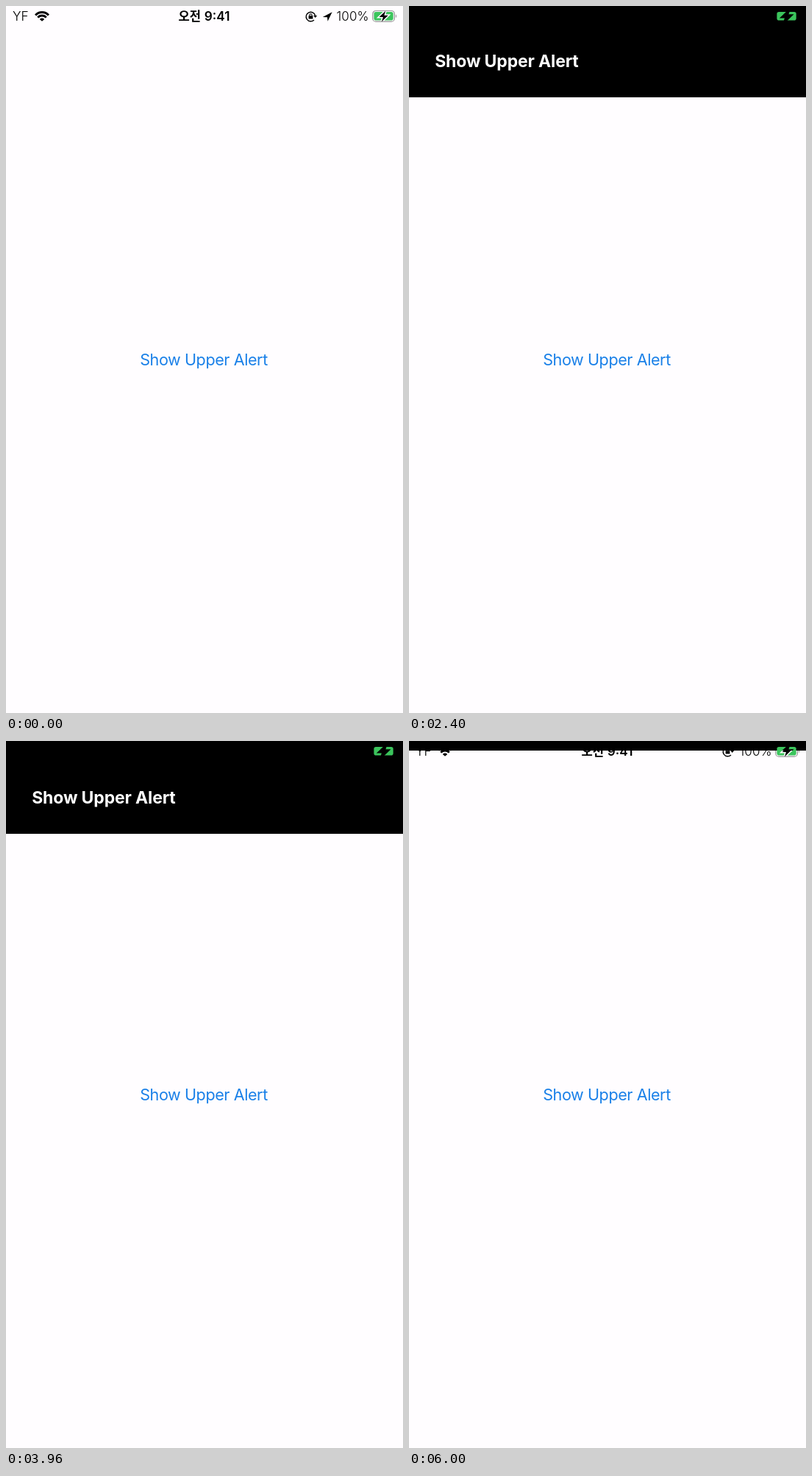
An HTML page for the animation above (6.04 s loop, 540x960 px).

```html
<!DOCTYPE html>
<html lang="en">
<head>
<meta charset="utf-8">
<title>Upper alert</title>
<style>
  html, body { margin: 0; width: 100%; height: 100%; overflow: hidden; background: #fffdff; }
  svg { display: block; width: 100%; height: 100%; }
  text { font-family: Inter, Roboto, sans-serif; }
  .hangul { font-family: "Noto Sans CJK KR", "Noto Sans CJK", "Noto Sans KR", sans-serif; }
</style>
</head>
<body>
<svg viewBox="0 0 540 960">
  <defs>
    <path id="bolt" d="M516.3 6.8 507.6 15H512.9L511 21.2 519.8 12.7H514.4Z"/>
    <mask id="boltGap" maskUnits="userSpaceOnUse" x="495" y="0" width="40" height="30">
      <rect x="495" width="40" height="30" fill="#fff"/>
      <use href="#bolt" stroke="#000" stroke-width="3"/>
    </mask>
  </defs>

  <text id="button" x="269" y="488" text-anchor="middle" font-size="21.6" letter-spacing="-.43" fill="#1a80e8">Show Upper Alert</text>

  <g id="alert">
    <rect y="-100" width="540" height="226"/>
    <text x="35.2" y="85" font-size="23" font-weight="700" letter-spacing="-.15" fill="#fff">Show Upper Alert</text>
  </g>

  <!-- status bar -->
  <g font-size="17.3">
    <text x="9" y="20.3" font-weight="300">YF</text>
    <text class="hangul" x="234.5" y="20" font-size="16.6" font-weight="600">오전</text>
    <text x="269.8" y="20.3" font-weight="600">9:41</text>
    <text x="449.6" y="20.3" font-size="17.1" font-weight="300">100%</text>
  </g>
  <g fill="none" stroke="#000" stroke-width="2.9">
    <path d="M40.1 12.5A12 12 0 0 1 57.9 12.5M43.3 15.6A7.6 7.6 0 0 1 54.7 15.6"/>
    <path d="M49 20.8 45.8 17.9A4.2 4.2 0 0 1 52.2 17.9Z" fill="#000" stroke="none"/>
  </g>
  <g id="lock" fill="none" stroke="#000" stroke-width="1.4">
    <path d="M420.6 13A6.3 6.3 0 1 0 419 18.9"/>
    <path d="M412.9 13.5V12.4A1.6 1.6 0 0 1 416.1 12.4V13.5" stroke-width="1.1"/>
    <path d="M411.6 13.2h5.8v4.4h-5.8ZM418.2 12.9h5l-2.5 3.2Z" fill="#000" stroke="none"/>
  </g>
  <path id="arrow" d="M430.8 15 443.6 8.3 437.6 20.8 437 15.2Z"/>
  <g>
    <rect x="498.8" y="6.5" width="29.6" height="14.6" rx="4.2" fill="none" stroke="#000" stroke-opacity=".42" stroke-width="1.2"/>
    <path d="M530 11.3Q532.2 13.8 530 16.3Z" fill-opacity=".45"/>
    <rect x="500.4" y="8" width="26.3" height="11.6" rx="2.8" fill="#3bc45c" mask="url(#boltGap)"/>
    <use href="#bolt"/>
  </g>
</svg>
<script>
const LOOP = 6040, HEIGHT = 126, SHOW = 300, HIDE = 200;
const alerts = [[825, 2384], [2610, 4110], [4350, 5845]];   // slide down, slide up
const presses = [[835, 880], [2600, 2985]];                 // touch down, release
const FADE = 300, PRESSED = 0.2;
const $ = id => document.getElementById(id);

// cubic-bezier(.42, 0, .58, 1)
function ease(x) {
  if (x <= 0) return 0;
  if (x >= 1) return 1;
  let lo = 0, hi = 1, s = 0.5;
  for (let i = 0; i < 20; i++) {
    s = (lo + hi) / 2;
    const u = 1 - s;
    if (1.26 * u * u * s + 1.74 * u * s * s + s ** 3 < x) lo = s; else hi = s;
  }
  return s * s * (3 - 2 * s);
}

function draw(t) {
  let shown = 0, opacity = 1;
  for (const [down, up] of alerts)
    shown += ease((t - down) / SHOW) - ease((t - up) / HIDE);
  for (const [down, up] of presses)
    if (t >= down) opacity = PRESSED + (1 - PRESSED) * ease((t - up) / FADE);

  $("alert").setAttribute("transform", `translate(0 ${Math.round((shown - 1) * HEIGHT)})`);
  $("button").setAttribute("opacity", opacity);

  // the location arrow goes out while the alert covers it
  const located = t < 1300;
  $("arrow").style.display = located ? "" : "none";
  $("lock").setAttribute("transform", `translate(${located ? 0 : 19} 0)`);
}

const start = performance.now();
function tick() {
  draw((performance.now() - start) % LOOP);
  requestAnimationFrame(tick);
}
tick();
</script>
</body>
</html>
```
